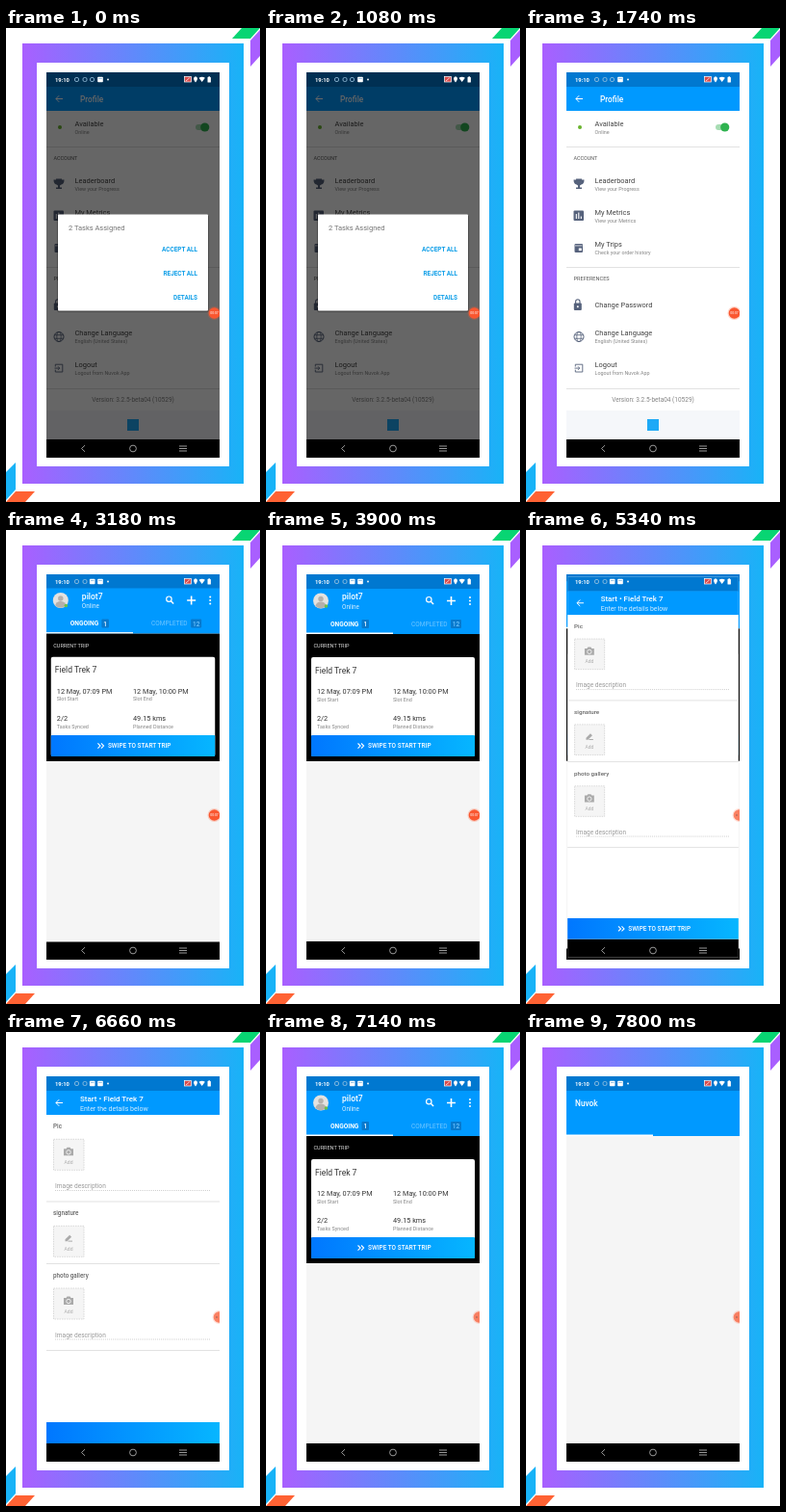
Animation, 264 px wide and 492 px high, one loop 8 s. Source, as an HTML page:

```html
<!DOCTYPE html>
<html lang="en">
<head>
<meta charset="utf-8">
<title>Trip app walkthrough</title>
<style>
  html, body { margin: 0; width: 100%; height: 100%; overflow: hidden; background: #fff; }
  svg { display: block; width: 100vw; height: 100vh; }
  text { font-family: Roboto, sans-serif; white-space: pre; }
</style>
</head>
<body>
<svg id="stage" viewBox="0 0 264 492"></svg>
<script>
const BLUE = '#0099ff', INK = '#424242', MUTED = '#858585', SLATE = '#56627c';
const APP = 'Nuvok', USER = 'pilot7', TRIP = 'Field Trek 7';

// Markup helpers
const text = (x, y, str, size, fill = INK, weight = 400, anchor = 'start') =>
  `<text x="${x}" y="${y}" font-size="${size}" fill="${fill}" font-weight="${weight}" text-anchor="${anchor}">${str}</text>`;
const rect = (x, y, w, h, fill, more = '') =>
  `<rect x="${x}" y="${y}" width="${w}" height="${h}" fill="${fill}" ${more}/>`;
const disc = (x, y, r, fill, more = '') =>
  `<circle cx="${x}" cy="${y}" r="${r}" fill="${fill}" ${more}/>`;
const line = (d, stroke, width = 1, more = '') =>
  `<path d="${d}" fill="none" stroke="${stroke}" stroke-width="${width}" ${more}/>`;
const shape = (d, fill) => `<path d="${d}" fill="${fill}"/>`;
const group = (id, body, more = '') => `<g id="${id}" ${more}>${body}</g>`;

const screen = (id, headerEnd, bodyFill, body) => group(id,
  rect(42, 46, 180, 400, bodyFill) + rect(42, 46, 180, 15.5, '#0078d0') +
  rect(42, 61, 180, headerEnd - 61, BLUE) + rect(42, 427, 180, 19, '#000') + body);
const backArrow = line('M59 73.5H52M55.2 70.2L51.9 73.5L55.2 76.8', '#fff', 1);
const divider = y => rect(42, y, 180, 1, '#e2e2e2');
const swipeLabel = (id, y) => group(id,
  line(`M95.5 ${y - 2.5}l2.6 2.6l-2.6 2.6M99 ${y - 2.5}l2.6 2.6l-2.6 2.6`, '#fff', 1.1) +
  text(106, y + 2.4, 'SWIPE TO START TRIP', 6.5, '#fff', 500));

function profileScreen() {
  const row = (y, title, sub) => text(71.5, y, title, 7.45) + (sub ? text(71.5, y + 8, sub, 5.4, MUTED) : '');
  const icons =
    shape('M52 156.500h6v1h2.500c0 3-1 4.500-3 5l-1.500 1v2h2v1.500h-6v-1.500h2v-2l-1.500-1c-2-.5-3-2-3-5h2.500z', SLATE) +
    rect(49.5, 189.5, 10.5, 10.5, SLATE, 'rx="1"') + line('M52.3 193v5M54.800 191.500v6.500M57.300 195.500v2.500', '#fff', 1.1) +
    rect(50.5, 224, 8.5, 9, SLATE, 'rx="1"') + rect(51, 225.600, 7.5, .7, '#fff') + rect(54.800, 228.500, 3, 2.700, '#fff') +
    rect(49.800, 285.500, 8, 7.5, SLATE, 'rx="1"') + line('M51.600 286v-2a2.200 2.200 0 0 1 4.400 0v2', SLATE, 1.1) + disc(53.800, 289.200, 1, '#fff') +
    disc(55, 320.500, 5, 'none', `stroke="${SLATE}"`) +
    `<ellipse cx="55" cy="320.5" rx="2.2" ry="5" fill="none" stroke="${SLATE}" stroke-width=".8"/>` +
    line('M50.500 318.700h9M50.500 322.300h9', SLATE, .8) +
    line('M51.300 351.500v-2.300h7.500v7.800h-7.500v-2.300M50.500 353.100h5M54 351.300l1.800 1.800l-1.800 1.800', SLATE, .9);
  return screen('profile', 86, '#fff', backArrow + text(77, 76.5, 'Profile', 8.3, '#fff', 500) +
    disc(56, 103, 2, '#69b42d') + row(102, 'Available') + text(71.5, 110, 'Online', 5.4, MUTED) +
    rect(197, 100, 12, 6, '#a8ddb4', 'rx="3"') + disc(206.7, 103, 4.6, '#2fb350') +
    divider(123) + text(49.5, 136.700, 'ACCOUNT', 5.4, '#555') +
    row(161, 'Leaderboard', 'View your Progress') + row(194, 'My Metrics', 'View your Metrics') +
    row(227, 'My Trips', 'Check your order history') +
    divider(248) + text(49.5, 262, 'PREFERENCES', 5.600, '#555') +
    row(290.3, 'Change Password') + row(319.3, 'Change Language', 'English (United States)') +
    row(352.3, 'Logout', `Logout from ${APP} App`) + icons +
    divider(374) + text(132, 388.2, 'Version: 3.2.5-beta04 (10529)', 6.5, MUTED, 400, 'middle') +
    rect(42, 397, 180, 30, '#f5f7fa') + rect(126, 406, 12, 12, '#1ea9f6'));
}

function homeScreen() {
  const fact = (x, y, value, label) => text(x, y, value, 7.3, '#333') + text(x, y + 7.8, label, 5.4, MUTED);
  const badge = (x, w, n, fill) => rect(x, 93, w, 9, '#0879cd', 'rx="1"') + text(x + w / 2, 100, n, 6.5, fill, 500, 'middle');
  return screen('home', 108, '#f5f5f5',
    disc(57, 73.5, 8, '#e4e2e0') + disc(57, 71.5, 2.7, '#b5b0ac') + shape('M51.500 79a5.500 4.500 0 0 1 11 0a8 8 0 0 1-11 0', '#b5b0ac') +
    disc(62.5, 79, 1.8, '#6cc04a') +
    text(79, 72.2, USER, 8.5, '#fff', 500) + text(79, 81.6, 'Online', 6.4, '#d6eeff') +
    disc(169.3, 72.2, 2.700, 'none', 'stroke="#fff" stroke-width="1.2"') + line('M171.300 74.200l2.800 2.800', '#fff', 1.4) +
    line('M188 73.500h9M192.500 69v9', '#fff', 1.6) + [70, 73.5, 77].map(y => disc(212, y, 1, '#fff')).join('') +
    text(67, 99.800, 'ONGOING', 6.6, '#fff', 700) + badge(99.5, 7.5, '1', '#fff') +
    text(151, 99.800, 'COMPLETED', 6.5, '#72c6ff') + badge(192, 11, '12', '#72c6ff') +
    rect(42, 106.500, 90, 1.5, '#fff') + rect(42, 108, 180, 132, '#000') +
    text(49.5, 122, 'CURRENT TRIP', 5.5, '#ddd') + rect(47, 132, 170, 103, '#fff', 'rx="2"') +
    text(51, 148.500, TRIP, 8.5, '#333') +
    fact(53, 169.800, '12 May, 07:09 PM', 'Slot Start') + fact(132, 169.800, '12 May, 10:00 PM', 'Slot End') +
    fact(53, 198, '2/2', 'Tasks Synced') + fact(132, 198, '49.15 kms', 'Planned Distance') +
    rect(47, 213, 170, 22, 'url(#swipe)', 'rx="1"') + swipeLabel('homeLabel', 224));
}

function startScreen() {
  const camera = y => shape(`M60 ${y - 3}h2.500l1-1.500h3l1 1.500h2.500v7h-10z`, '#aaa') + disc(65, y + .5, 2.2, '#aaa', 'stroke="#f5f5f5" stroke-width=".9"');
  const pencil = y => shape(`M61.500 ${y + 1}l4.600-4.600l2 2l-4.600 4.600h-2z`, '#aaa') + rect(64.500, y + 2.300, 4.5, 1, '#aaa');
  const field = (y, label, icon) => text(49, y, label, 6.3, '#666', 500) +
    rect(49.5, y + 11, 31.5, 32, '#f5f5f5', 'stroke="#d0d0d0" stroke-width=".8" stroke-dasharray="1.5 1"') +
    icon(y + 24) + text(65, y + 36.5, 'Add', 5, '#aaa', 400, 'middle');
  const note = y => text(51, y, 'Image description', 6.6, '#9a9a9a') + line(`M51 ${y + 2.500}H213`, '#c4c4c4', .8, 'stroke-dasharray="1 1"');
  return screen('start', 86, '#fff', backArrow +
    text(77, 72.2, `Start • ${TRIP}`, 8, '#fff', 500) + text(77, 82, 'Enter the details below', 7, '#d2ecff') +
    field(100.3, 'Pic', camera) + note(162) + divider(175.5) +
    field(190.3, 'signature', pencil) + divider(240) +
    field(255, 'photo gallery', camera) + note(316.500) + divider(330) +
    rect(42, 405, 180, 22, 'url(#swipe)') + swipeLabel('startLabel', 416));
}

const splashScreen = () => screen('splash', 108, '#f5f5f5',
  text(51, 77, APP, 8.3, '#fff', 500) + rect(42, 106.500, 90, 1.5, '#fff'));

function dialog() {
  const action = (y, str) => text(199, y, str, 6.4, '#109fe8', 700, 'end');
  return group('dialog', rect(42, 46, 180, 381, '#000', 'opacity=".6"') +
    rect(53, 194, 158, 101, '#000', 'rx="2" opacity=".25"') + rect(54, 193.5, 156, 100, '#fff', 'rx="1"') +
    text(65, 209.600, '2 Tasks Assigned', 7.5, '#757575') +
    action(232.3, 'ACCEPT ALL') + action(257.3, 'REJECT ALL') + action(282.3, 'DETAILS'));
}

function systemBars() {
  const sync = x => rect(x - 2, 51.5, 4, 4, 'none', 'rx="1.5" stroke="#9cc4e0" stroke-width=".8"');
  const note = x => rect(x - 2.8, 50.8, 5.6, 5.4, '#fff', 'rx=".8"') + rect(x - 1.8, 52, 3.6, .6, '#5a9fd0');
  return text(51, 55.700, '19:10', 5.800, '#fff', 700) + sync(73.5) + sync(82) +
    group('noteOld', sync(89.500)) + group('noteNew', note(89.700)) + note(98) + disc(106, 53.5, .9, '#fff') +
    rect(185.5, 50.5, 7, 5.5, '#d94c4c', 'stroke="#fff" stroke-width=".7"') + line('M187 55l4-3.500', '#fff', .7) +
    shape('M197 56.500c-3-3.500-2-6 0-6s3 2.500 0 6', '#fff') + shape('M200.500 51.800q3.200-2.200 6.400 0l-3.200 4.200z', '#fff') +
    rect(209.5, 51, 3.4, 5.5, '#fff', 'rx=".6"') + rect(210.4, 50.300, 1.6, 1, '#fff') +
    line('M82 433.200L78.500 436.500L82 439.800', '#9a9a9a', 1) + disc(132, 436.5, 3.4, 'none', 'stroke="#9a9a9a"') +
    line('M180 434h8M180 436.500h8M180 439h8', '#9a9a9a', 1);
}

const gradient = (id, from, to) =>
  `<linearGradient id="${id}"><stop stop-color="${from}"/><stop offset="1" stop-color="${to}"/></linearGradient>`;

document.getElementById('stage').innerHTML =
  `<defs>${gradient('frame', '#a95fff', '#18b3f7')}${gradient('swipe', '#0077ff', '#06b6ff')}
   <clipPath id="phone">${rect(42, 46, 180, 400, '#000')}</clipPath></defs>` +
  shape('M17 16H247V473H17ZM32 36V455H232V36Z', 'url(#frame)') +
  shape('M245 0H264L254 11H235Z', '#08d573') + shape('M264 2V29L254 40V13Z', '#a95fff') +
  shape('M0 461L10 451V479L0 490Z', '#18b3f7') + shape('M10 481H30L20 492H0Z', '#ff6233') +
  group('view', homeScreen() + profileScreen() + startScreen() + splashScreen() + dialog() + systemBars() +
    group('recorder', disc(0, 0, 7, '#ff5a2e', 'opacity=".25"') + disc(0, 0, 5.8, '#fa5730') +
      group('timer', text(0, 1.3, '00:07', 3.4, '#fff', 400, 'middle')) + group('bead', disc(-2.5, 0, 1, '#a33a22'))),
    'clip-path="url(#phone)"');

// Motion
const LOOP = 8000, SHIFT = 400;
const el = id => document.getElementById(id);
const ramp = (t, from, length) => Math.min(1, Math.max(0, (t - from) / length));
const settle = x => x < 1 / 6 ? .4 * (6 * x) ** 2.5 : 1 - .6 * ((1 - x) * 1.2) ** 9;
const progress = (t, from) => settle(ramp(t, from, SHIFT));

function pose(id, opacity, scale = 1) {
  el(id).setAttribute('opacity', opacity);
  el(id).setAttribute('transform', `translate(132 246) scale(${scale}) translate(-132 -246)`);
}
const enter = (id, t, from) => pose(id, ramp(t, from + 50, 50), .85 + .15 * progress(t, from));
const leave = (id, t, from) => pose(id, 1 - ramp(t, from + 35, 83), 1 - .15 * progress(t, from));

function swipe(id, t, from) {
  const k = ramp(t, from, 220);
  el(id).setAttribute('opacity', 1 - k);
  el(id).setAttribute('transform', `translate(${40 * k} 0)`);
}

function render(t) {
  const profileClose = 3040, startOpen = 5210, startClose = 6760;
  pose('dialog', 1 - ramp(t, 1570, 150));
  leave('profile', t, profileClose);
  if (t < 6000) enter('start', t, startOpen);
  else leave('start', t, startClose);
  const behind = t < 4500 ? 1 - progress(t, profileClose)
    : t < 6000 ? progress(t, startOpen) : 1 - progress(t, startClose);
  pose('home', 1, 1 + .045 * behind);
  pose('splash', ramp(t, 7400, 240));
  swipe('homeLabel', t < 6000 ? t : 0, 4740);
  swipe('startLabel', t, 6420);

  const synced = t >= 1920;
  el('noteOld').setAttribute('opacity', synced ? 0 : 1);
  el('noteNew').setAttribute('opacity', synced ? 1 : 0);

  const dock = ramp(t, 4800, 300);
  el('recorder').setAttribute('transform', `translate(${216.5 + 5 * dock} 296)`);
  el('recorder').setAttribute('opacity', 1 - .25 * dock);
  el('timer').setAttribute('opacity', 1 - dock);
  el('bead').setAttribute('opacity', dock);
}

function tick() {
  render(performance.now() % LOOP);
  requestAnimationFrame(tick);
}
tick();
</script>
</body>
</html>
```
